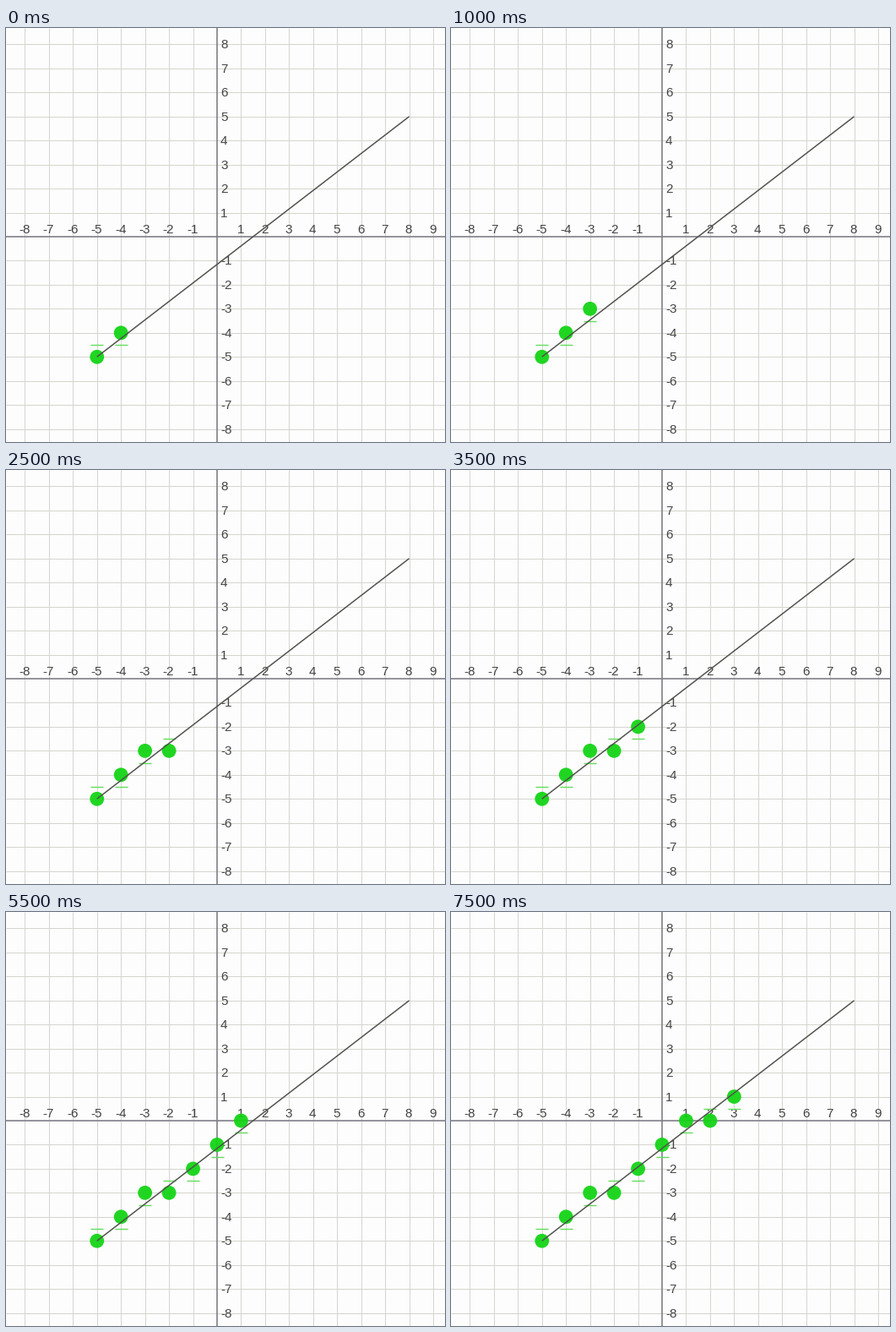
Write a matplotlib script that moves like this. It is 520 by 490 pixels and loops after 8 s.

```python
import matplotlib.pyplot as plt
from matplotlib.animation import FuncAnimation
from matplotlib.patches import Circle

W, H, DPI = 520, 490, 100
UNIT, OX, OY = 28.45, 250, 247
PX = 72 / DPI  # one pixel in points

START, END = (-5, -5), (8, 5)
PAPER, GRID, AXIS = "#fdfdfd", "#d5d5cf", "#7c7c84"
INK, TEXT = "#51514d", "#444446"
DOT, DASH = "#12d414", "#62de5c"


def px(x):
    return OX + x * UNIT


def py(y):
    return OY - y * UNIT


def midpoint_steps():
    """Yield each plotted cell together with the midpoint that was tested."""
    (x0, y0), (x1, y1) = START, END
    slope = (y1 - y0) / (x1 - x0)
    y = y0
    for x in range(x0, x1 + 1):
        mid = y + 0.5
        if y0 + slope * (x - x0) > mid:
            y += 1
        yield x, y, mid


fig = plt.figure(figsize=(W / DPI, H / DPI), dpi=DPI, facecolor=PAPER)
ax = fig.add_axes([0, 0, 1, 1])
ax.set(xlim=(0, W), ylim=(H, 0))
ax.axis("off")


def rule(xs, ys, color, width, zorder):
    return ax.plot(xs, ys, color=color, lw=width * PX, zorder=zorder,
                   solid_capstyle="butt")[0]


def label(x, y, n, align):
    ax.text(x, y, str(n), family="Liberation Sans", size=15.2 * PX,
            color=TEXT, ha=align, va="center_baseline",
            zorder=3, clip_on=True)


for n in range(-9, 10):
    if n == 0:
        continue
    rule([px(n)] * 2, [0, H], GRID, 1, 1)
    label(px(n) - 0.5, 237.3, n, "center")
    if abs(n) < 9:
        rule([0, W], [py(n)] * 2, GRID, 1, 1)
        label(254, py(n) - 0.5, n, "left")

rule([0, W], [OY, OY], AXIS, 1.6, 2)
rule([OX, OX], [0, H], AXIS, 1.6, 2)
rule([px(START[0]), px(END[0])], [py(START[1]), py(END[1])], INK, 1.5, 6)

steps = []
for x, y, mid in midpoint_steps():
    dash = rule([px(x) - 7.5, px(x) + 7.5], [py(mid)] * 2, DASH, 1.4, 4)
    dot = ax.add_patch(Circle((px(x), py(y)), 8.4, fc=DOT, ec="none",
                              alpha=0.94, zorder=5))
    steps.append((dash, dot))


def draw(frame):
    shown = 2 + frame // 2  # a new step every second
    for i, pair in enumerate(steps):
        for artist in pair:
            artist.set_visible(i < shown)
    return [a for pair in steps for a in pair]


anim = FuncAnimation(fig, draw, frames=16, interval=500, repeat=True,
                     repeat_delay=0, init_func=lambda: draw(0))
plt.show()
```
